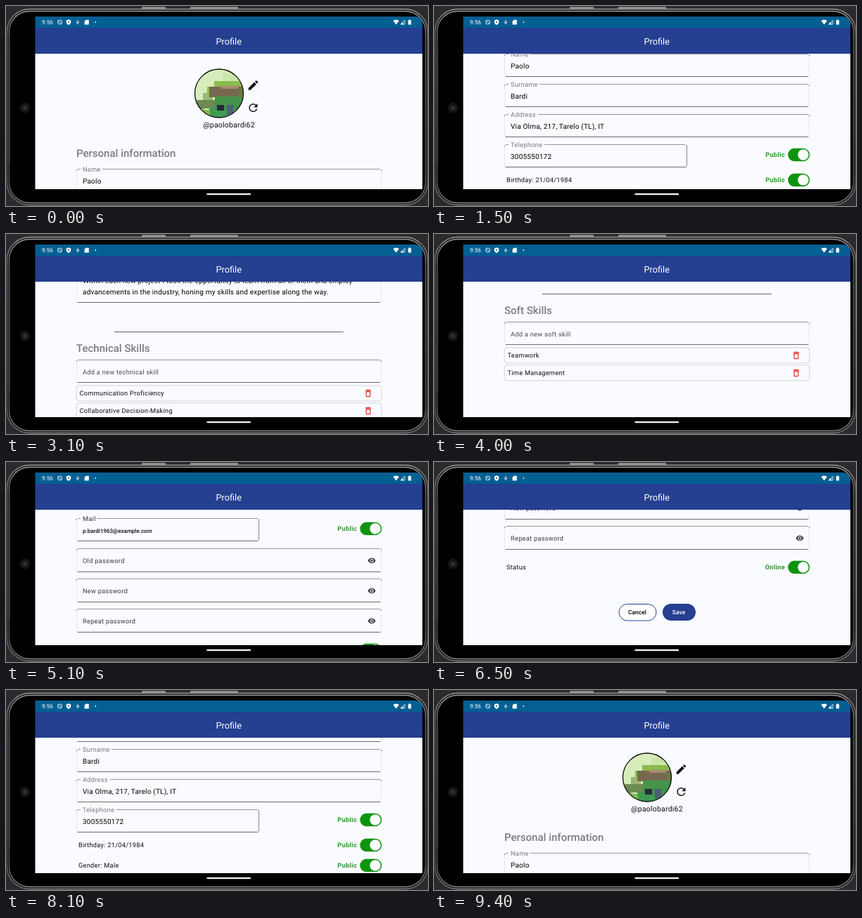
Recreate the animation shown at these times as an HTML page. Size 600 by 285 pixels, loop 9.7 s.

```html
<!DOCTYPE html>
<html lang="en">
<head>
<meta charset="utf-8">
<title>Profile screen</title>
<style>
html, body { margin: 0; width: 100%; height: 100%; overflow: hidden; background: #2b2b2d; }
svg { display: block; width: 100vw; height: 100vh; }
text { font-family: Roboto, sans-serif; text-rendering: geometricPrecision; white-space: pre; }
</style>
</head>
<body>
<svg id="stage" viewBox="0 0 600 285" xmlns="http://www.w3.org/2000/svg">
  <defs>
    <clipPath id="view"><rect x="41.5" y="68" width="550.5" height="193"/></clipPath>
    <clipPath id="round"><circle cx="303" cy="124.5" r="34.5"/></clipPath>
    <linearGradient id="rim" x1="0" x2="0" y1="0" y2="1">
      <stop offset="0" stop-color="#9a9a9a"/><stop offset=".15" stop-color="#606060"/>
      <stop offset=".85" stop-color="#505050"/><stop offset="1" stop-color="#858585"/>
    </linearGradient>
  </defs>
  <g id="phone"></g>
  <g clip-path="url(#view)"><g id="page"></g></g>
  <g id="bars"></g>
</svg>
<script>
const LOOP = 9700, STEP = 100;
const BLUE = '#253f91', GREEN = '#0f930f', INK = '#0c0d10', GREY = '#77787c';
const $ = id => document.getElementById(id);

// ---- small drawing helpers ----
const rect = (x, y, w, h, fill, r = 0, more = '') =>
  `<rect x="${x}" y="${y}" width="${w}" height="${h}" rx="${r}" fill="${fill}" ${more}/>`;
const circle = (x, y, r, fill, more = '') =>
  `<circle cx="${x}" cy="${y}" r="${r}" fill="${fill}" ${more}/>`;
const path = (d, fill, more = '') => `<path d="${d}" fill="${fill}" ${more}/>`;
const stroke = (d, color, width = 1) => path(d, 'none', `stroke="${color}" stroke-width="${width}"`);

// y is the middle of the line
function text(s, x, y, { size = 9.2, fill = INK, weight = 400, gap = 0.3, anchor = 'start' } = {}) {
  return `<text x="${x}" y="${y + size * 0.36}" font-size="${size}" fill="${fill}" ` +
    `font-weight="${weight}" letter-spacing="${gap}" text-anchor="${anchor}">${s}</text>`;
}
const icon = (d, cx, cy, k, fill) =>
  path(d, fill, `transform="translate(${cx - 12 * k} ${cy - 12 * k}) scale(${k})"`);

const ICON = {
  edit: 'M3 17.25V21h3.75L17.81 9.94l-3.75-3.75L3 17.25zM20.71 7.04a1 1 0 0 0 0-1.41l-2.34-2.34a1 1 0 0 0-1.41 0l-1.83 1.83 3.75 3.75 1.83-1.83z',
  refresh: 'M17.65 6.35A7.96 7.96 0 0 0 12 4a8 8 0 1 0 7.73 10h-2.08A6 6 0 1 1 12 6c1.66 0 3.14.69 4.22 1.78L13 11h7V4z',
  bin: 'M16 9v10H8V9h8m-1.5-6h-5l-1 1H5v2h14V4h-3.5l-1-1zM18 7H6v12c0 1.1.9 2 2 2h8c1.1 0 2-.9 2-2V7z',
  eye: 'M12 4.5C7 4.5 2.7 7.6 1 12c1.7 4.4 6 7.5 11 7.5s9.3-3.1 11-7.5c-1.7-4.4-6-7.5-11-7.5zM12 17a5 5 0 1 1 0-10 5 5 0 0 1 0 10zm0-8a3 3 0 1 0 0 6 3 3 0 0 0 0-6z'
};

// ---- page parts ----
// Thin outline: firm bottom edge, softer top edge, faint sides (firm on short boxes)
function box(y, right = 534, h = 32) {
  const top = y - 0.5, low = top + h;
  return stroke(`M102 ${top}H${right - 2}`, '#96979b') +
    stroke(`M101.5 ${low}H${right - 1.5}`, '#6c6d71') +
    stroke(`M100.5 ${top + 1}V${low - 1}`, '#e6e7eb') +
    stroke(`M${right - 0.5} ${top + 1}V${low - 1}`, right < 534 ? '#85868a' : '#e6e7eb') +
    stroke(`M100.5 ${top + 0.5}v2M${right - 0.5} ${top + 0.5}v2`, '#85868a');
}
function field(y, label, labelWidth, right, h, color = GREY) {
  return box(y, right, h) + rect(106, y - 2, labelWidth + 5, 4, '#fafbff') +
    text(label, 109, y, { fill: color });
}
const value = (s, y) => text(s, 109, y, { size: 10, gap: 0.2, fill: '#000' });

function toggle(y, label) {
  return text(label, 499, y, { fill: '#2f972f', weight: 700, anchor: 'end' }) +
    rect(503.3, y - 9.3, 30.9, 18.6, GREEN, 9.3) + circle(525, y, 7.7, '#fff');
}
const info = (s, y, label = 'Public') => text(s, 103, y) + toggle(y, label);
const heading = (s, y) => text(s, 100, y, { size: 15, weight: 500, fill: '#7b7c80', gap: 0 });

function skills(y, title, hint, items) {
  return stroke(`M154 ${y + 0.5}H480`, '#66676b') + heading(title, y + 24) + box(y + 41) +
    text(hint, 109, y + 57.5, { fill: '#48494d' }) +
    items.map((s, i) => {
      const top = y + 77 + i * 25;
      return rect(100, top, 434, 22, 'none', 4, 'stroke="#c9cace" stroke-width=".8"') +
        text(s, 104.5, top + 11) + icon(ICON.bin, 515, top + 11, 0.58, '#e02d20');
    }).join('');
}
const secret = (s, y) => box(y, 534, 33) + text(s, 109, y + 16.5, { fill: '#38393d' }) +
  icon(ICON.eye, 520, y + 16.5, 0.5, '#3c3d42');

function avatar() {
  const blocks = [
    [268, 89, 70, 72, '#d7ecbb'], [308, 96, 30, 14, '#cbe6a6'],
    [296, 107, 42, 9, '#8abb4c'], [286, 115, 6, 10, '#8abb4c'],
    [280, 124, 14, 12, '#9ab873'], [268, 134, 14, 26, '#8fbf55'],
    [272, 134, 26, 12, '#6d8a52'], [289, 115, 49, 15, '#77694f'],
    [306, 114, 24, 4, '#a98b72'], [297, 129, 41, 13, '#44954a'],
    [289, 145, 49, 16, '#3f9a52'], [297, 140, 41, 8, '#3f9248'],
    [300, 141, 10, 8, '#26283a'], [314, 141, 9, 14, '#4d5f78'],
    [330, 118, 8, 12, '#6a7a45'], [280, 148, 10, 13, '#7fb84e']
  ];
  return `<g clip-path="url(#round)">${blocks.map(b => rect(...b)).join('')}</g>` +
    circle(303, 124.5, 34.5, 'none', 'stroke="#0b0b0b" stroke-width="1.3"');
}

function drawPage() {
  const about = [
    'I am a curious and motivated person who enjoys working with others on new ideas.',
    'Over the years I have taken part in several projects, both large and small, and I',
    'have learned to plan my work with care and to listen to the needs of the people',
    'around me. I like clear goals, simple tools and honest feedback at every stage.',
    'Within each new project I took the opportunity to learn from all of them and employ',
    'advancements in the industry, honing my skills and expertise along the way.'
  ];
  const button = { size: 8.5, weight: 500, gap: 0, anchor: 'middle' };
  $('page').innerHTML = [
    avatar(),
    icon(ICON.edit, 351.5, 113, 0.76, '#111'),
    icon(ICON.refresh, 351.5, 145, 0.76, '#111'),
    text('@paolobardi62', 317, 169.5, { size: 10.5, gap: 0.2, anchor: 'middle' }),
    heading('Personal information', 210),
    field(233, 'Name', 26), value('Paolo', 249),
    field(276, 'Surname', 39), value('Bardi', 292),
    field(319, 'Address', 37), value('Via Olma, 217, Tarelo (TL), IT', 335),
    field(362, 'Telephone', 46, 360), value('3005550172', 378.5), toggle(376, 'Public'),
    info('Birthday: 21/04/1984', 412),
    info('Gender: Male', 441),
    field(473, 'Description', 50, 534, 112),
    ...about.map((s, i) => value(s, 489 + i * 16)),
    skills(626, 'Technical Skills', 'Add a new technical skill',
      ['Communication Proficiency', 'Collaborative Decision-Making', 'Problem Solving']),
    skills(816, 'Soft Skills', 'Add a new soft skill', ['Teamwork', 'Time Management']),
    heading('Account', 1002),
    field(1027, 'Mail', 18, 360, 32, '#333438'),
    text('p.bardi1963@example.com', 109, 1044, { size: 8, gap: 0, weight: 500 }),
    toggle(1041, 'Public'),
    secret('Old password', 1070), secret('New password', 1113), secret('Repeat password', 1156),
    info('Status', 1214, 'Online'),
    rect(263, 1266.5, 53, 23.5, '#fff', 11.7, `stroke="${BLUE}"`),
    text('Cancel', 289, 1278, { ...button, fill: '#000' }),
    rect(325, 1266, 47, 24, BLUE, 12),
    text('Save', 348, 1278, { ...button, fill: '#fff' })
  ].join('');
}

function drawPhone() {
  $('phone').innerHTML = [
    rect(0, 0, 600, 285, '#2b2b2d'),
    rect(193, 1, 34, 4, '#8b8b8b', 1), rect(262, 1, 68, 4, '#8b8b8b', 1),
    rect(1.5, 4.5, 598, 279, '#161617', 32, 'stroke="url(#rim)" stroke-width="1.4"'),
    rect(4.5, 7.5, 592, 273, '#000', 29, 'stroke="url(#rim)" stroke-width="1.4"'),
    rect(3, 54, 3, 170, '#3a3a3b', 1),
    circle(27, 145, 7.5, '#141416'), circle(27, 145, 4, '#232329'), circle(27, 145, 1.6, '#3d3d48'),
    rect(41.5, 68, 550.5, 193, '#fafbff')
  ].join('');
}

function drawBars() {
  const white = '#fff';
  $('bars').innerHTML = [
    path('M41.5 15H582a10 10 0 0 1 10 10V31H41.5z', '#045f93'),
    rect(41.5, 31, 550.5, 37, BLUE),
    text('Profile', 316.7, 50.3, { size: 12.8, gap: 0, anchor: 'middle', fill: white }),
    text('9:56', 51, 23.3, { size: 8.3, gap: 0, fill: white }),
    circle(76.5, 23, 3, 'none', 'stroke="#fff" stroke-width=".9"'),
    stroke('M74.4 20.9L78.6 25.1', white, 0.9),
    path('M89 19.2l3.2 1.2v2.4c0 2-1.4 3.6-3.2 4.2c-1.8-.6-3.2-2.2-3.2-4.2v-2.4z', white),
    circle(89, 22.8, 1.1, '#045f93'),
    stroke('M102 19.8V26.4M100.3 22V23.6L102 24.8L103.7 23.6V22', white, 0.8),
    path('M113.6 19.8h4.2v6.6h-6.2v-4.6z', white),
    circle(127.3, 23, 0.9, white),
    path('M550.4 21q4.3-3.2 8.6 0l-4.3 5.4z', white),
    stroke('M567 20.4v5.6h-5.6z', white, 0.8), path('M564.6 22.6v3.6h-3.6z', white),
    rect(571.7, 20.2, 4.4, 6.4, white, 0.6), rect(573, 19.4, 1.8, 1.2, white),
    rect(285.3, 267, 63, 2.2, '#f4f4f4', 1.1)
  ].join('');
}

// ---- scrolling: [time, offset], joined by a monotone cubic ----
const track = [
  [0, 0], [750, 0], [1500, 164], [3100, 487], [5100, 946], [5350, 952], [5450, 952],
  [6400, 1064], [7450, 1064], [7750, 520], [8100, 191], [8500, 65], [9000, 0], [LOOP, 0]
];
const pitch = i => (track[i + 1][1] - track[i][1]) / (track[i + 1][0] - track[i][0]);
const slopes = track.map((_, i) => {
  if (!i || i === track.length - 1) return 0;
  const a = pitch(i - 1), b = pitch(i);
  return a * b > 0 ? 2 * a * b / (a + b) : 0;
});

function scrollAt(t) {
  const i = track.findIndex((p, k) => k === track.length - 2 || t < track[k + 1][0]);
  const [t0, y0] = track[i], [t1, y1] = track[i + 1];
  const d = t1 - t0, u = (t - t0) / d, v = 1 - u;
  return y0 * (1 + 2 * u) * v * v + y1 * u * u * (3 - 2 * u) +
    d * u * v * (slopes[i] * v - slopes[i + 1] * u);
}

function render(now) {
  const t = Math.floor((now % LOOP) / STEP) * STEP;
  $('page').setAttribute('transform', `translate(0 ${-Math.round(scrollAt(t))})`);
}
function tick() {
  render(performance.now());
  requestAnimationFrame(tick);
}

drawPhone();
drawPage();
drawBars();
tick();
</script>
</body>
</html>
```
